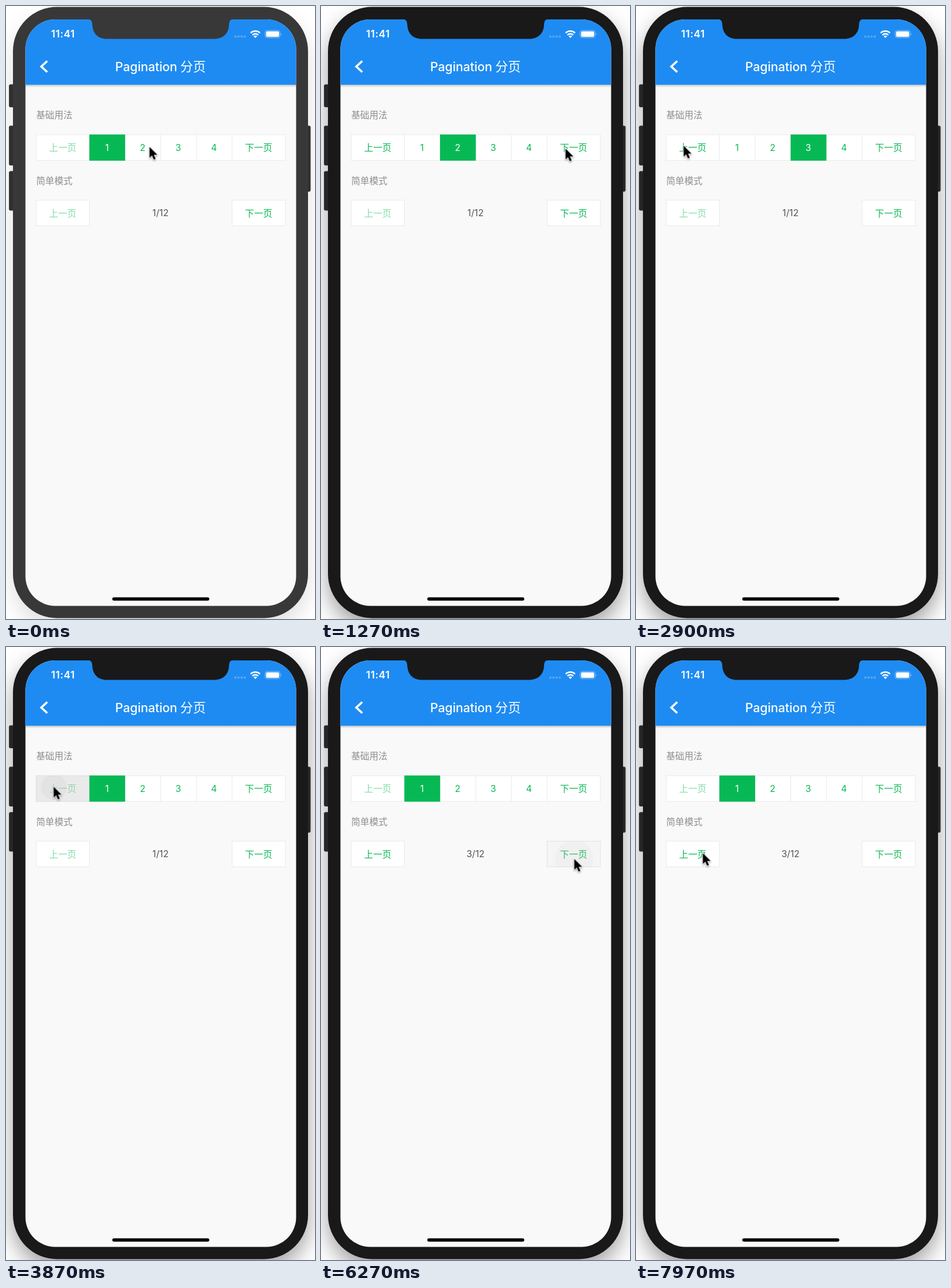
Animation of 532x1053 px, one loop 8 s. Source, as an HTML page:

```html
<!DOCTYPE html>
<html lang="zh-CN">
<head>
<meta charset="utf-8">
<title>Pagination</title>
<style>
html, body { margin: 0; width: 100%; height: 100%; overflow: hidden; background: #fff; }
svg { display: block; }
#stage { position: absolute; left: 0; top: 0; }
text { font-family: Inter, "Noto Sans CJK SC", "Noto Sans CJK", sans-serif; font-size: 15.6px; }
.mid { text-anchor: middle; }
.label { fill: #8e8e8e; }
.cell { fill: #fff; stroke: #e9e9e9; }
.green { fill: #07b954; }
.count { fill: #555; }
.on rect { fill: #07b954; }
.on text { fill: #fff; }

.body, .side, .glow, .prev, .on, .count, .cursor { animation: 8s infinite; }
.body { fill: #191919; animation-name: wake; }
.side { fill: #262626; stroke: #3d3d3d; animation-name: wakeSide; }
.glow { animation-name: glow; }
@keyframes wake { 0% { fill: #383838; } 3% { fill: #191919; } }
@keyframes wakeSide { 0% { fill: #303030; } 3% { fill: #262626; } }
@keyframes glow { 0% { opacity: .35; } 3% { opacity: 1; } }

/* Page and counter states switch without easing */
.prev, .on, .count { animation-timing-function: step-end; }
.p1 { animation-name: p1; }
.p2 { animation-name: p2; }
.p3 { animation-name: p3; }
.c1 { animation-name: c1; }
.c2 { animation-name: c2; }
.c3 { animation-name: c3; }
.top { animation-name: topPrev; }
.low { animation-name: lowPrev; }
@keyframes p1 { 0%, 46.25%, 100% { opacity: 1; } 7.125% { opacity: 0; } }
@keyframes p2 { 0%, 18.75%, 46.25%, 100% { opacity: 0; } 7.125%, 38.75% { opacity: 1; } }
@keyframes p3 { 0%, 38.75%, 100% { opacity: 0; } 18.75% { opacity: 1; } }
@keyframes topPrev { 0%, 46.25%, 100% { opacity: .5; } 7.125% { opacity: 1; } }
@keyframes lowPrev { 0% { opacity: .5; } 67.5%, 100% { opacity: 1; } }
@keyframes c1 { 0% { opacity: 1; } 67.5%, 100% { opacity: 0; } }
@keyframes c2 { 0%, 74.875%, 100% { opacity: 0; } 67.5% { opacity: 1; } }
@keyframes c3 { 0% { opacity: 0; } 74.875%, 100% { opacity: 1; } }

/* Tap feedback: each press starts one loop at its own delay */
.press rect, .press circle { opacity: 0; animation: 8s linear var(--at) infinite; }
.press rect { fill: #bcbcbc; animation-name: tint; }
.press circle { fill: #c8c8c8; animation-name: splash; }
@keyframes tint { 0%, 5%, 100% { opacity: 0; } 1.9% { opacity: .4; } }
@keyframes splash {
  0% { r: 2px; opacity: .4; }
  5% { r: 42px; opacity: 0; }
  100% { r: 42px; opacity: 0; }
}

.cursor { animation-name: point; animation-timing-function: ease-in-out; }
@keyframes point {
  0%, 9% { transform: translate(247px, 242px); }
  17%, 27% { transform: translate(428px, 245px); }
  35.5%, 50% { transform: translate(82px, 240px); }
  59.6% { transform: translate(208px, 326px); }
  65.5%, 83% { transform: translate(436px, 364px); }
  93%, 100% { transform: translate(115px, 354px); }
}
</style>
</head>
<body>
<svg id="stage" width="532" height="1053" viewBox="0 0 532 1053">
  <defs>
    <clipPath id="screen"><rect x="33.5" y="23" width="466" height="1007.5" rx="51"/></clipPath>
    <filter id="soft" x="-20%" y="-20%" width="140%" height="140%"><feGaussianBlur stdDeviation="18"/></filter>
    <filter id="drop" x="-50%" y="-50%" width="220%" height="220%">
      <feDropShadow dx="0" dy="1.5" stdDeviation="1.3" flood-opacity=".4"/>
    </filter>
    <linearGradient id="fall" x2="0" y2="1">
      <stop stop-opacity=".2"/><stop offset="1" stop-opacity="0"/>
    </linearGradient>
  </defs>

  <rect class="glow" x="12" y="18" width="508" height="1050" rx="78" fill="rgba(0,0,0,.38)" filter="url(#soft)"/>

  <g class="side">
    <rect x="5.5" y="135" width="10" height="38.5" rx="2"/>
    <rect x="5.5" y="206" width="10" height="67.5" rx="2"/>
    <rect x="5.5" y="284" width="10" height="67" rx="2"/>
    <rect x="514" y="206" width="10" height="112.5" rx="2"/>
  </g>
  <rect class="body" x="12" y="1.5" width="508" height="1050" rx="76"/>

  <g clip-path="url(#screen)">
    <rect x="33" y="23" width="467" height="1008" fill="#f9f9f9"/>
    <rect x="33" y="135" width="467" height="5" fill="url(#fall)"/>
    <rect x="33" y="23" width="467" height="112.3" fill="#1e8bf2"/>
  </g>
  <path class="body" d="M140 22Q148.500 23 148.500 31C149 47 158 56.500 174 56.500H358C374 56.500 384 47 384 31Q384 23 392 22Z"/>

  <g fill="#fff">
    <text class="mid" x="98" y="54.300" style="font-size:17.500px;font-weight:600;letter-spacing:.4px">11:41</text>
    <g opacity=".25">
      <circle cx="395" cy="52.500" r="2"/><circle cx="400.300" cy="52.500" r="2"/>
      <circle cx="405.700" cy="52.500" r="2"/><circle cx="411" cy="52.500" r="2"/>
    </g>
    <g fill="none" stroke="#fff" stroke-width="2.500">
      <path d="M421.200 46.300A11.500 11.500 0 0 1 437.400 46.300"/>
      <path d="M424.300 49.800A7 7 0 0 1 434.300 49.800"/>
    </g>
    <path d="M429.300 55L426.300 52Q429.300 49.400 432.300 52Z"/>
    <rect x="446" y="42" width="26" height="12.500" rx="3.600" fill="none" stroke="#fff" stroke-opacity=".45"/>
    <rect x="447.700" y="43.600" width="22.600" height="9.300" rx="2.200"/>
    <path d="M473.500 46.200Q475.500 48.200 473.500 50.400Z" opacity=".5"/>
    <path d="M71 94.500L60.800 104L71 113.500" fill="none" stroke="#fff" stroke-width="3.700"/>
    <text x="188" y="111.500" style="font-size:21.200px;font-weight:500">Pagination</text>
    <text x="300" y="112" style="font-size:22px;font-weight:500">分页</text>
  </g>

  <text class="label" x="52" y="193">基础用法</text>
  <text class="label" x="52" y="305.500">简单模式</text>

  <rect class="cell" x="52" y="221" width="429" height="44.300"/>
  <path d="M143.700 221v44M205.200 221v44M266.500 221v44M327.800 221v44M389.200 221v44" stroke="#e9e9e9"/>
  <rect class="cell" x="52" y="333.500" width="91.500" height="44"/>
  <rect class="cell" x="389.200" y="333.500" width="91.800" height="44"/>

  <g class="green mid">
    <text class="prev top" x="97.700" y="249">上一页</text>
    <text x="174" y="248.700">1</text>
    <text x="235.300" y="248.700">2</text>
    <text x="296.500" y="248.700">3</text>
    <text x="358" y="248.700">4</text>
    <text x="435" y="249">下一页</text>
    <text class="prev low" x="97.700" y="361.500">上一页</text>
    <text x="435" y="361.500">下一页</text>
  </g>

  <g class="mid">
    <g class="on p1"><rect x="143.500" y="220.700" width="61.600" height="45"/><text x="174" y="248.700">1</text></g>
    <g class="on p2"><rect x="204.900" y="220.700" width="61.600" height="45"/><text x="235.300" y="248.700">2</text></g>
    <g class="on p3"><rect x="266.200" y="220.700" width="61.600" height="45"/><text x="296.500" y="248.700">3</text></g>
    <text class="count c1" x="266" y="361">1/12</text>
    <text class="count c2" x="266" y="361">2/12</text>
    <text class="count c3" x="266" y="361">3/12</text>
  </g>

  <g id="presses"></g>

  <rect x="183" y="1015.700" width="167" height="5.800" rx="2.900"/>

  <g class="cursor">
    <path transform="scale(1.08)" d="M0 0V17.300L4 13.600L6.800 20.200L9.800 18.900L7 12.500H12.500Z"
      stroke="#fff" stroke-width="1.300" paint-order="stroke" filter="url(#drop)"/>
  </g>
</svg>
<script>
// Each press: delay in ms, cell x, y, width, then the touched point inside it
const presses = [
  [540, 204.9, 220.7, 61.6, 42, 23],
  [1470, 389, 220.7, 92.5, 39, 25],
  [3070, 51.5, 220.7, 92.5, 31, 20],
  [3670, 51.5, 220.7, 92.5, 31, 20],
  [5370, 389, 333, 92.5, 47, 31],
  [5960, 389, 333, 92.5, 47, 31]
];
document.getElementById('presses').innerHTML = presses.map(([at, x, y, w, cx, cy]) =>
  `<svg class="press" style="--at:${at}ms" x="${x}" y="${y}" width="${w}" height="45" overflow="hidden">
    <rect width="${w}" height="45"/><circle cx="${cx}" cy="${cy}" r="2"/>
  </svg>`).join('');
</script>
</body>
</html>
```
